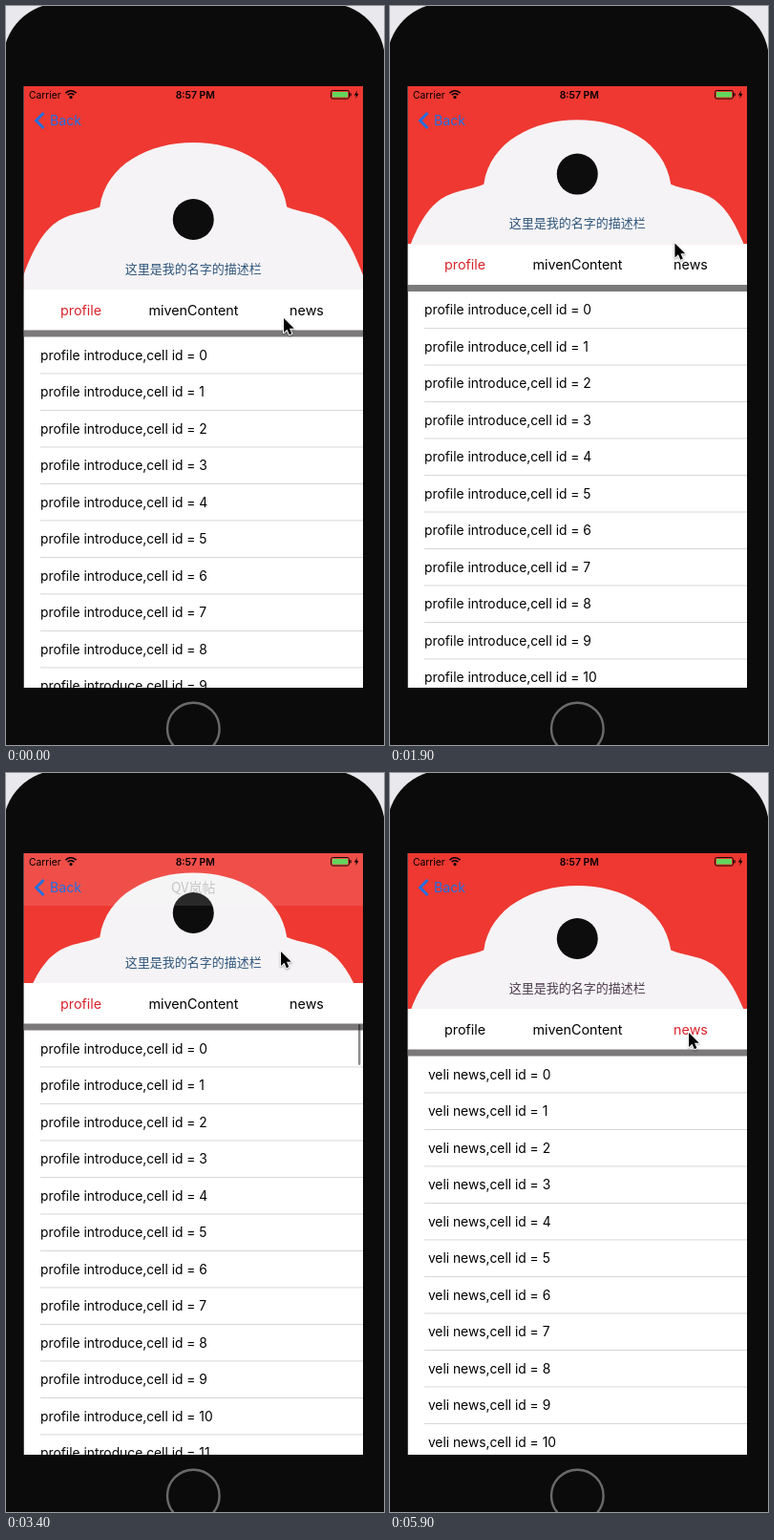
Write an HTML page with a canvas that moves like this. It is 396 by 774 pixels and loops after 6 s.

```html
<!DOCTYPE html>
<html lang="zh">
<head>
<meta charset="utf-8">
<style>
html, body { margin: 0; width: 100%; height: 100%; overflow: hidden; background: #e9e8ec; }
canvas { display: block; width: 396px; height: 774px; }
</style>
</head>
<body>
<canvas id="stage" width="396" height="774"></canvas>
<script>
const ctx = document.getElementById('stage').getContext('2d');
const LOOP = 6000, STEP = 100;
const SCREEN = { x: 18.5, y: 84, w: 355.5, h: 630 };
const MID = SCREEN.x + SCREEN.w / 2;
const ROW = 38.5;
const SANS = 'Inter, Roboto, sans-serif';
const CJK = '"Noto Sans CJK SC", "Noto Sans CJK", sans-serif';
const TABS = [['profile', 78.5], ['mivenContent', 196.5], ['news', 315]];
const ROWS = ['profile introduce', ' mivenContent', ' veli news'];

// Tracks are lists of [time, value, ...]
const header = [[0, 213], [200, 208], [600, 181], [800, 168], [1400, 100], [1600, 112],
  [2300, 248], [2500, 232], [2800, 163], [3000, 160], [3400, 136], [3700, 148], [4000, 163]];
const pointer = [[0, 291, 327], [600, 292, 324], [900, 292, 300], [1400, 288, 138],
  [1600, 289, 160], [2300, 313, 385], [2700, 312, 370], [3400, 288, 187], [3700, 285, 195],
  [4200, 215, 222], [4500, 215, 222], [4900, 196, 270], [5100, 196, 270], [5450, 313, 272]];
const indicator = [[900, 0, 88], [1100, 1, 88], [1600, 1, 80], [1900, 0, 60],
  [2900, 0, 43], [3100, 1, 43], [3600, 1, 43], [3900, 0, 60]];
const pages = [[5000, 0], [5300, 1], [5500, 1], [5800, 2]];

const clamp = v => Math.max(0, Math.min(1, v));

function sample(track, t) {
  const next = track.findIndex(key => key[0] > t);
  if (next === 0) return track[0].slice(1);
  if (next < 0) return track[track.length - 1].slice(1);
  const a = track[next - 1], b = track[next];
  const p = (t - a[0]) / (b[0] - a[0]);
  const eased = p * p * (3 - 2 * p);
  return a.slice(1).map((v, i) => v + (b[i + 1] - v) * eased);
}

function rect(x, y, w, h, color) {
  ctx.fillStyle = color;
  ctx.fillRect(x, y, w, h);
}

function disc(x, y, r, color) {
  ctx.fillStyle = color;
  ctx.beginPath();
  ctx.arc(x, y, r, 0, Math.PI * 2);
  ctx.fill();
}

function box(x, y, w, h, r) {
  ctx.beginPath();
  ctx.roundRect(x, y, w, h, r);
}

function poly(points) {
  ctx.beginPath();
  points.forEach(([x, y]) => ctx.lineTo(x, y));
}

function text(str, x, y, size, { color = '#000', align = 'left', weight = 400, family = SANS } = {}) {
  ctx.font = `${weight} ${size}px ${family}`;
  ctx.textAlign = align;
  ctx.textBaseline = 'alphabetic';
  ctx.fillStyle = color;
  ctx.fillText(str, x, y + size * 0.36);
}

function drawPhone() {
  rect(0, 0, 396, 774, '#e9e8ec');
  ctx.fillStyle = '#0b0b0b';
  box(-3, -3, 400, 900, 60);
  ctx.fill();
  ctx.strokeStyle = '#6a6a6a';
  ctx.lineWidth = 2.4;
  ctx.beginPath();
  ctx.arc(196.3, 757, 27.3, 0, Math.PI * 2);
  ctx.stroke();
}

function drawCover(height, labelColor) {
  const bottom = SCREEN.y + height;
  ctx.save();
  ctx.beginPath();
  ctx.rect(SCREEN.x, SCREEN.y, SCREEN.w, height);
  ctx.clip();
  rect(SCREEN.x, SCREEN.y, SCREEN.w, height, '#ee3831');

  ctx.translate(MID, SCREEN.y + height / 2);
  ctx.fillStyle = '#f5f3f5';
  ctx.beginPath();
  ctx.moveTo(-178, 130);
  ctx.lineTo(-178, 92);
  ctx.bezierCurveTo(-152, 20, -128, 32, -98, 20);
  ctx.bezierCurveTo(-85, -70, 85, -70, 98, 20);
  ctx.bezierCurveTo(128, 32, 152, 20, 178, 92);
  ctx.lineTo(178, 130);
  ctx.fill();
  ctx.restore();

  disc(MID, bottom - 73.5, 21.5, '#0d0d0d');
  text('这里是我的名字的描述栏', MID, bottom - 22, 13, { color: labelColor, align: 'center', family: CJK });
}

function drawNavigation(height) {
  const fade = clamp((150 - height) / 118);
  rect(SCREEN.x, SCREEN.y, SCREEN.w, 55, `rgba(255,255,255,${fade})`);
  text('QV岚帖', MID, 120, 14, {
    color: `rgba(50,50,50,${clamp(fade * 2)})`, align: 'center', family: CJK
  });

  const blue = '#1f70e4';
  ctx.strokeStyle = blue;
  ctx.lineWidth = 2.8;
  poly([[39.5, 112], [31.5, 120], [39.5, 128]]);
  ctx.stroke();
  text('Back', 46, 120, 14.2, { color: blue });
}

function drawStatus() {
  text('Carrier', 24, 93, 10.3);
  text('8:57 PM', MID + 2, 93, 10.4, { align: 'center', weight: 600 });

  ctx.strokeStyle = '#000';
  ctx.lineWidth = 1.6;
  for (const r of [4.4, 7.4]) {
    ctx.beginPath();
    ctx.arc(68, 96.2, r, -Math.PI * 0.77, -Math.PI * 0.23);
    ctx.stroke();
  }
  disc(68, 95.6, 1.6, '#000');

  ctx.lineWidth = 0.9;
  box(340.5, 88.5, 19, 8.6, 2);
  ctx.stroke();
  rect(342, 90, 16, 5.6, '#62d65c');
  rect(360.4, 91.2, 1.2, 3.2, '#000');
  ctx.fillStyle = '#000';
  poly([[368, 88.5], [364.8, 93.5], [367, 93.5], [366.2, 97], [369.4, 92], [367.3, 92]]);
  ctx.fill();
}

function drawTabs(top, active) {
  rect(SCREEN.x, top, SCREEN.w, 43, '#fff');
  TABS.forEach(([label, x], i) =>
    text(label, x, top + 21.5, 14.3, { color: i === active ? '#d8232b' : '#000', align: 'center' }));
  rect(SCREEN.x, top + 42.5, SCREEN.w, 7, '#7b7979');
}

function drawList(top, left, label) {
  for (let i = 0; top + i * ROW < 714; i++) {
    const y = top + i * ROW;
    text(`${label},cell id = ${i}`, left + 17.5, y + 19.5, 13.8);
    rect(left + 17.5, y + ROW - 0.4, SCREEN.w - 17.5, 0.7, '#c6c5ca');
  }
}

function drawPointer(x, y) {
  ctx.save();
  ctx.translate(x, y);
  poly([[0, 0], [0, 15], [3.5, 11.8], [5.9, 17.2], [8.4, 16], [6, 10.8], [10.8, 10.8]]);
  ctx.closePath();
  ctx.lineJoin = 'round';
  ctx.lineWidth = 2;
  ctx.strokeStyle = '#fff';
  ctx.shadowColor = 'rgba(0,0,0,.35)';
  ctx.shadowBlur = 2;
  ctx.shadowOffsetY = 1;
  ctx.stroke();
  ctx.shadowColor = 'transparent';
  ctx.fillStyle = '#000';
  ctx.fill();
  ctx.restore();
}

function draw(t) {
  const [height] = sample(header, t);
  const [page] = sample(pages, t);
  const [barAlpha, barLength] = sample(indicator, t);
  const bottom = SCREEN.y + height;
  const active = t < 5000 ? 0 : t < 5500 ? 1 : 2;
  const labelColor = t < 4200 ? '#2f567c' : t < 4500 ? '#aaa4a8' : '#4e3c4e';

  drawPhone();
  ctx.save();
  ctx.beginPath();
  ctx.rect(SCREEN.x, SCREEN.y, SCREEN.w, SCREEN.h);
  ctx.clip();
  rect(SCREEN.x, SCREEN.y, SCREEN.w, SCREEN.h, '#fff');
  ROWS.forEach((label, i) => {
    if (Math.abs(i - page) < 1) drawList(bottom + 49.5, SCREEN.x + (i - page) * SCREEN.w, label);
  });
  drawCover(height, labelColor);
  drawTabs(bottom, active);
  ctx.fillStyle = `rgba(0,0,0,${barAlpha * 0.45})`;
  box(369, bottom + 43, 2.4, barLength, 1.2);
  ctx.fill();
  drawNavigation(height);
  drawStatus();
  ctx.restore();
  drawPointer(...sample(pointer, t));
}

const start = performance.now();
function tick() {
  const elapsed = (performance.now() - start) % LOOP;
  draw(Math.floor(elapsed / STEP) * STEP);
  requestAnimationFrame(tick);
}
tick();
</script>
</body>
</html>
```
